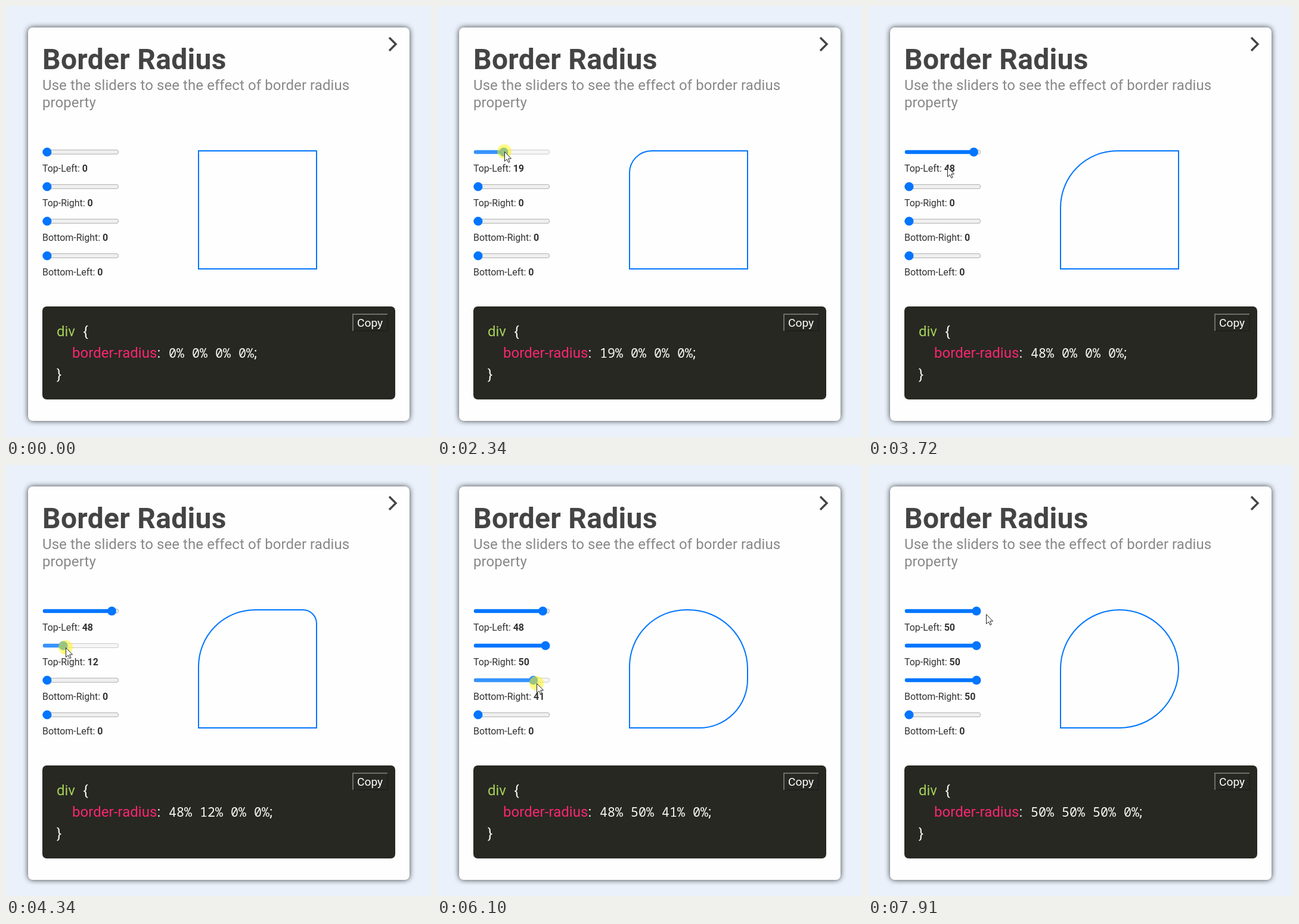
An HTML page with a canvas that plays this animation: 713x723 px, repeating every 7990 ms.

```html
<!DOCTYPE html>
<html lang="en">
<head>
<meta charset="utf-8">
<title>Border Radius</title>
<style>
  html, body { margin: 0; width: 100%; height: 100%; overflow: hidden; background: #eaf1fa; }
  canvas { display: block; }
</style>
</head>
<body>
<canvas id="stage" width="713" height="723"></canvas>
<script>
const ctx = document.getElementById('stage').getContext('2d');
const LOOP = 7990, START = 318, STEP = 77;
const SANS = 'Roboto, sans-serif', MONO = '"Noto Sans Mono", monospace';
const BLUE = '#0075ff', LIGHT = '#f8f8f2';
const LABELS = ['Top-Left', 'Top-Right', 'Bottom-Right', 'Bottom-Left'];
const LEFT = 61, WIDTH = 128, MAX = 50;
const rowY = row => 245 + row * 58;
const thumbX = value => 69 + value * 2.26;
const valueAt = x => Math.max(0, Math.min(MAX, Math.round((x - 69) / 2.26)));

const linear = f => f;
const smooth = f => f * f * (3 - 2 * f);
const easeOut = f => 1 - (1 - f) ** 2;

// Pointer moves in steps; one with a row holds that slider until the next move
const ENTRY = { x: 620, y: 712 };
const MOVES = [
  { from: 0, to: 10, x: 75, y: 279, ease: smooth },
  { from: 11, to: 17, x: 72, y: 245, ease: easeOut },
  { from: 19, to: 37, x: 178, y: 243, ease: linear, row: 0, grab: 1 },
  { from: 40, to: 49, x: 70, y: 307, ease: smooth },
  { from: 49, to: 61.6, x: 195, y: 301, ease: linear, row: 1, grab: 4 },
  { from: 65, to: 68, x: 70, y: 364, ease: smooth },
  { from: 72, to: 79, x: 214, y: 367, ease: easeOut, row: 2, grab: 5 },
  { from: 82, to: 89, x: 179, y: 244, ease: smooth },
  { from: 91, to: 93, x: 195, y: 244, ease: linear, row: 0, grab: 1 },
  { from: 95, to: 98, x: 198, y: 250, ease: linear }
];

const COLORS = {
  idle: { fill: BLUE, track: '#efefef', edge: '#b2b2b2' },
  hover: { fill: '#005cc8', track: '#e5e5e5', edge: '#a0a0a0' },
  active: { fill: '#3793ff', track: '#f5f5f5', edge: '#cbcbcb' }
};

// Replays the moves up to a step: pointer, slider values and the held row
function stateAt(step) {
  let at = ENTRY, held;
  const values = LABELS.map(() => 0);
  for (const m of MOVES) {
    if (step < m.from) break;
    const f = m.ease(Math.min(1, (step - m.from) / (m.to - m.from)));
    at = { x: at.x + (m.x - at.x) * f, y: at.y + (m.y - at.y) * f };
    held = m.row;
    if (held !== undefined) values[held] = valueAt(at.x - m.grab);
  }
  return { x: Math.round(at.x), y: Math.round(at.y), values, held };
}

// Draws text and returns the x where it ends
function text(str, x, y, font, color, spacing = 0) {
  ctx.font = font;
  ctx.letterSpacing = spacing + 'px';
  ctx.fillStyle = color;
  ctx.fillText(str, x, y);
  return x + ctx.measureText(str).width;
}

function box(x, y, w, h, r, color) {
  ctx.beginPath();
  ctx.roundRect(x, y, w, h, r);
  ctx.fillStyle = color;
  ctx.fill();
}

function disc(x, y, r, color) {
  ctx.beginPath();
  ctx.arc(x, y, r, 0, Math.PI * 2);
  ctx.fillStyle = color;
  ctx.fill();
}

function card() {
  ctx.fillStyle = '#eaf1fa';
  ctx.fillRect(0, 0, 713, 723);
  ctx.save();
  ctx.shadowColor = 'rgba(0,0,0,.75)';
  ctx.shadowBlur = 10;
  box(37, 36, 640, 660, 8, '#fefefe');
  ctx.restore();

  text('Border Radius', 61, 106, `bold 48px ${SANS}`, '#444', 0.27);
  const sub = `24px ${SANS}`;
  text('Use the sliders to see the effect of border radius', 61, 141, sub, '#888', 0.08);
  text('property', 61, 170, sub, '#888', 0.08);

  ctx.beginPath();
  ctx.moveTo(643, 53);
  ctx.lineTo(654, 64);
  ctx.lineTo(643, 75);
  ctx.strokeStyle = '#444';
  ctx.lineWidth = 3.4;
  ctx.stroke();
}

function slider(row, value, look) {
  const y = rowY(row), x = thumbX(value), c = COLORS[look];
  const start = value ? x - 6 : LEFT, end = LEFT + WIDTH;
  box(start, y - 4, end - start, 8, 4, c.edge);
  box(start + 1, y - 3, end - start - 2, 6, 3, c.track);
  if (value) box(LEFT + .75, y - 3.25, x - LEFT, 6.5, 3.25, c.fill);
  disc(x, y, 7.5, c.fill);
  const next = text(LABELS[row] + ': ', LEFT, y + 33, `16px ${SANS}`, '#333', -0.04);
  text(String(value), next, y + 33, `bold 16px ${SANS}`, '#333');
}

function preview(values) {
  ctx.beginPath();
  ctx.roundRect(323, 243, 198, 198, values.map(v => Math.max(0, v * 2 - 1)));
  ctx.strokeStyle = BLUE;
  ctx.lineWidth = 2;
  ctx.stroke();
}

function code(values) {
  const sans = `24px ${SANS}`, mono = `21.67px ${MONO}`;
  box(61, 504, 592, 156, 7.2, '#272822');
  text('div', 85, 554, sans, '#a6d25a');
  text('{', 129.5, 554, sans, LIGHT);
  let x = text('border-radius', 111, 590, sans, '#f92672', 0.05);
  text(':', x, 590, sans, LIGHT);
  x = text(values.map(v => v + '%').join(' '), 273, 590, mono, LIGHT);
  text(';', x, 590, sans, LIGHT);
  text('}', 85, 626, sans, LIGHT);

  ctx.fillStyle = '#20211c';
  ctx.fillRect(581, 516, 60, 30);
  ctx.fillStyle = '#6e6e6a';
  ctx.fillRect(581, 516, 59, 2);
  ctx.fillRect(581, 516, 2, 29);
  ctx.fillStyle = '#272822';
  ctx.fillRect(583, 518, 56, 26);
  text('Copy', 589, 538, `19.2px ${SANS}`, '#fff');
}

function cursor(x, y) {
  ctx.save();
  ctx.translate(x + .5, y + .5);
  const arrow = new Path2D('M0 0V16L3.7 12.6L6.4 18L8.6 17L6.2 11.5H11Z');
  ctx.fillStyle = '#fff';
  ctx.fill(arrow);
  ctx.strokeStyle = '#222';
  ctx.lineWidth = 1;
  ctx.stroke(arrow);
  ctx.restore();
}

function draw(t) {
  const step = Math.floor((t - START) / STEP);
  const { x, y, values, held } = stateAt(step);
  const pressed = held !== undefined;
  const over = row => x >= LEFT && x <= LEFT + WIDTH && Math.abs(y - rowY(row)) <= 8;

  card();
  values.forEach((v, row) => {
    const look = held === row ? 'active' : !pressed && over(row) ? 'hover' : 'idle';
    slider(row, v, look);
  });
  preview(values);
  code(values);
  if (pressed) disc(x, y, 12, 'rgba(255,245,0,.5)');
  if (step >= 0) cursor(x, y);
}

const begin = performance.now();
function tick() {
  draw((performance.now() - begin) % LOOP);
  requestAnimationFrame(tick);
}
tick();
</script>
</body>
</html>
```
